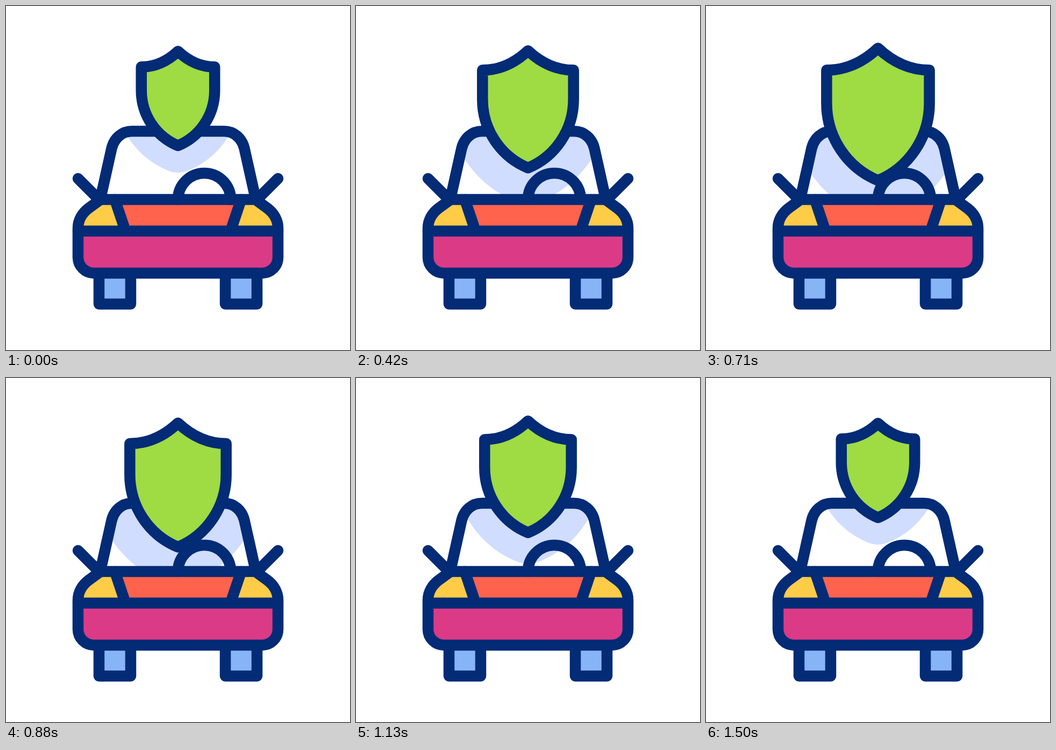
Recreate the animation shown at these times as an HTML page. Size 640 px wide and 640 px high, loop 1.54 s.

```html
<!DOCTYPE html>
<html lang="en">
<head>
<meta charset="utf-8">
<title>Car shield</title>
<style>
  html, body { margin: 0; width: 100%; height: 100%; overflow: hidden; background: #fff; }
  svg { display: block; width: 100vw; height: 100vh; }
  .line { fill: none; stroke: #032b76; stroke-width: 20.5; stroke-linecap: round; stroke-linejoin: round; }
</style>
</head>
<body>
<svg viewBox="0 0 640 640">
  <defs>
    <path id="glass" d="M176 357L196.5 265C201 246 216 233 234 233H406C424 233 439 246 443.5 265L464 357"/>
    <path id="body" d="M176 360L154 376C142 385 134 398 134 413V467.5A29.5 29.5 0 0 0 163.500 497H476.500A29.500 29.500 0 0 0 506 467.500V413C506 398 498 385 486 376L464 360Z"/>
    <clipPath id="inGlass"><use href="#glass"/></clipPath>
    <clipPath id="inBody"><use href="#body"/></clipPath>
  </defs>

  <g clip-path="url(#inGlass)">
    <path id="halo" fill="#d0ddff" stroke="#d0ddff" stroke-linejoin="round"/>
  </g>

  <g fill="#87b4f7">
    <path d="M173 497H232V554.500H173ZM408 497H467V554.500H408Z"/>
  </g>
  <g clip-path="url(#inBody)">
    <path fill="#ffcc47" d="M124 360H516V419H124Z"/>
    <path fill="#ff624d" d="M202.500 360H437.500L418 418H222Z"/>
    <path fill="#db3a87" d="M124 418H516V507H124Z"/>
  </g>

  <g class="line">
    <path d="M173 497V554.500H232V497M408 497V554.500H467V497"/>
    <use href="#glass"/>
    <use href="#body"/>
    <path d="M134 418.700H506M202.500 360L221 415M437.500 360L419 415"/>
    <path d="M134 321L172 359M506 321L468 359"/>
    <path d="M320 360A49 49 0 0 1 418 360"/>
  </g>

  <path id="shield" class="line" style="fill:#9fdb43"/>
</svg>
<script>
  const LOOP = 1540, FRAME = 1000 / 24, PEAK = 16.8;
  const halo = document.getElementById('halo');
  const shield = document.getElementById('shield');

  // Half of the outline in units of half width, from the top tip to the bottom tip.
  const half = [
    [0, -1.2875], [-.28, -1.024], [-.6, -.86], [-1, -.86],
    [-1, -.22],
    [-1, .45], [-.6, 1.04], [0, 1.2875]
  ];

  function outline(size, cy) {
    const at = (i, side) => `${(320 + side * half[i][0] * size).toFixed(2)} ${(cy + half[i][1] * size).toFixed(2)}`;
    const run = (side, ids) => ids.map(i => at(i, side)).join(' ');
    return `M${at(0, 1)}C${run(1, [1, 2, 3])}L${at(4, 1)}C${run(1, [5, 6, 7])}` +
           `C${run(-1, [6, 5, 4])}L${at(3, -1)}C${run(-1, [2, 1, 0])}Z`;
  }

  const ease = (u, p) => u ** p / (u ** p + (1 - u) ** p);

  // Linear growth, then a slightly slowing return.
  function grow(n) {
    if (n <= PEAK) return n / PEAK;
    if (n <= 27) return 1 - (n - PEAK) / (27 - PEAK) * .549;
    return .451 * (36 - n) / 9;
  }

  function draw(now) {
    const t = now % LOOP;
    const n = Math.min(36, Math.floor((t + 4) / FRAME));
    const u = grow(n);
    const d = outline(68.2 + 27.7 * u, 172 + 29.5 * ease(u, 2));
    shield.setAttribute('d', d);
    halo.setAttribute('d', d);
    halo.setAttribute('stroke-width', 2 * (50 + 21 * ease(u, 3)));
  }

  const start = performance.now();
  function tick() {
    draw(performance.now() - start);
    requestAnimationFrame(tick);
  }
  tick();
</script>
</body>
</html>
```
